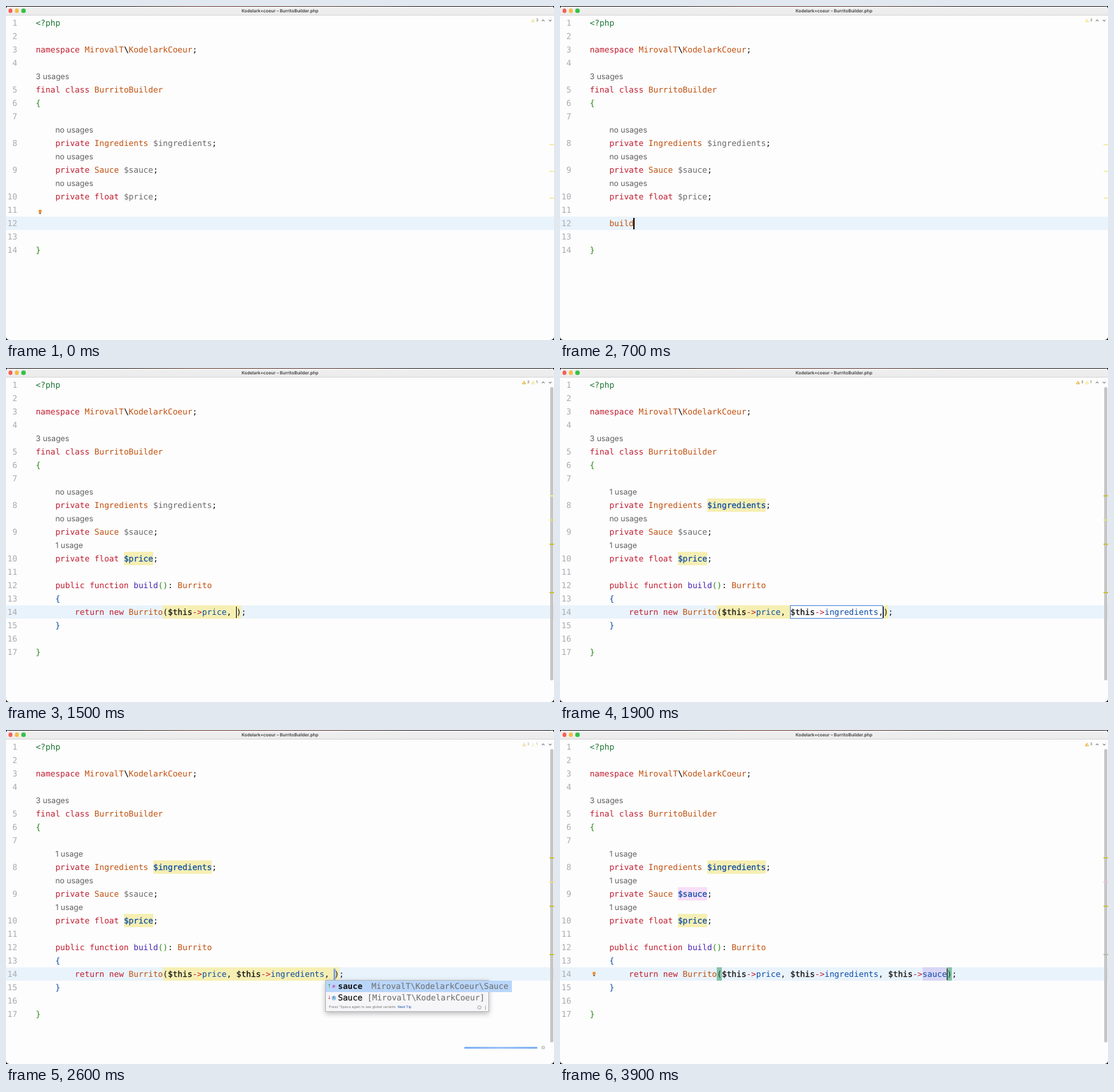
Recreate the animation shown at these times as an HTML page. Size 860 by 525 pixels, loop 4000 ms.

```html
<!DOCTYPE html>
<html lang="en">
<head>
<meta charset="utf-8">
<title>Code editor</title>
<style>
  html, body { margin: 0; width: 100%; height: 100%; overflow: hidden; background: #111; }
  i, b { font-style: normal; font-weight: normal; }
  #win {
    position: relative; width: 860px; height: 525px; overflow: hidden;
    border-radius: 5px; background: #fdfdfd;
    font: 12.757px/21px "DejaVu Sans Mono", monospace; color: #111;
    white-space: pre; text-rendering: geometricPrecision;
  }
  #win > * , .abs { position: absolute; }
  .bar {
    left: 0; top: 0; width: 860px; height: 15px; box-sizing: border-box;
    background: linear-gradient(#f2f0f0, #ebebeb); border-bottom: 1px solid #d6d6d6;
    font: 600 6.85px/15px Inter, sans-serif; color: #3c3c3c; text-align: center;
  }
  .edge { left: 0; top: 0; width: 860px; height: 1px; background: linear-gradient(90deg, #222 20%, #6b4334 35%, #5c3c34 60%, #222 75%); }
  .light { position: absolute; top: 4.4px; width: 6.4px; height: 6.4px; border-radius: 50%; }

  #code { left: 0; top: 16px; width: 860px; }
  #over { left: 0; top: 0; }
  .row { position: relative; height: 21px; line-height: 23px; padding-left: 46.7px; }
  .row.cur { background: #e9f3fb; }
  .num { position: absolute; left: 0; width: 17.6px; text-align: right; color: #a9abb0; }
  .hint { font: 12.2px/21px Inter, sans-serif; color: #626262; }
  .kw { color: #c01d30; }
  .cls { color: #c0500e; }
  .tag { color: #1a7430; }
  .grn { color: #2c8a18; }
  .blu, .prop { color: #0b4ca8; }
  .fn { color: #4a25b4; }
  .mute { color: #696969; }
  .bold { font-weight: bold; }
  .medium { -webkit-text-stroke: .3px; }
  .warn, .pink, .lav, .match, .box { display: inline-block; height: 21px; }
  .warn { background: #f6efb3; }
  .pink { background: #f7dff8; }
  .lav { background: #d9d6f6; }
  .match { background: #86c2a6; color: #103c28; }
  .box { background: #fdfdfd; box-shadow: inset 0 0 0 1px #4a7fd6; }
  .caret, .soft { position: relative; }
  .caret::before, .soft::before { content: ""; position: absolute; left: -.6px; top: -2px; width: 1.4px; height: 18px; background: #000; }
  .soft::before { left: -1.5px; width: 3px; background: #6f9be0; opacity: .85; }
  .bulb { left: 50.7px; width: 5.6px; height: 5.6px; border-radius: 50%; background: #ea923c; }
  .bulb::after { content: ""; position: absolute; left: 1.6px; top: 5.2px; width: 2.4px; height: 2.2px; background: #8d7a68; }

  .tri {
    top: 19.8px; width: 6.4px; height: 5.8px; clip-path: polygon(50% 0, 100% 100%, 0 100%);
    background: linear-gradient(#fff, #fff) center 70% / .8px 3px no-repeat, var(--c);
  }
  .count { top: 18px; font: 6px/10px Inter, sans-serif; color: #555; }
  .mark { left: 853px; width: 7px; height: 1.6px; }
  .thumb { left: 854.4px; top: 30px; width: 4.2px; height: 461px; border-radius: 2px; background: #c6c6c6; }
  .load { left: 719px; top: 498px; width: 115px; height: 2.6px; border-radius: 2px; background: linear-gradient(90deg, #7db0f2, #9cc3f6 50%, #7db0f2); }
  .stop { left: 840px; top: 496.2px; width: 6px; height: 6px; border-radius: 50%; background: #cfcfcf; font: 5px/6px Inter, sans-serif; color: #fff; text-align: center; }

  .popup { box-sizing: border-box; background: #f6f6f8; border: 1px solid #b4b4b8; box-shadow: 0 3px 8px #0004; }
  .item { position: relative; height: 18.4px; line-height: 20px; padding-left: 19px; box-sizing: border-box; }
  .item.on { background: #b9d6fa; }
  .type { position: absolute; right: 5.6px; color: #6c6c6c; }
  .dir { position: absolute; left: 2px; width: 5px; font: 8px/18px "DejaVu Sans", sans-serif; text-align: center; }
  .ico { position: absolute; left: 9.4px; top: 6px; width: 6.4px; height: 6.4px; border-radius: 50%; font: bold 5px/6.2px Inter, sans-serif; text-align: center; }
  .tip { position: absolute; left: 5px; bottom: 0; font: 5.35px/12px Inter, sans-serif; color: #777; }
  .tip b { color: #2a62b8; font-weight: 500; padding-left: 3px; }
  .ring { position: absolute; right: 11px; bottom: 3.4px; width: 3.6px; height: 3.6px; border: .8px solid #999; border-radius: 50%; }
  .dots { position: absolute; right: 4px; bottom: 5.2px; width: 1.3px; height: 1.3px; background: #555; box-shadow: 0 -2.2px #555, 0 2.2px #555; }
  .knob { position: absolute; left: 250px; top: 1px; width: 4px; height: 11px; border-radius: 2px; background: #bcbcbc; }
</style>
</head>
<body>
<div id="win">
  <div class="bar">Kodelark=coeur – BurritoBuilder.php<i class="light" style="left:3.8px;background:#f5605a"></i><i class="light" style="left:14px;background:#f6bb3e"></i><i class="light" style="left:24.3px;background:#35c148"></i></div>
  <div class="edge"></div>
  <div id="code"></div>
  <div id="over"></div>
  <svg width="860" height="30" style="left:0;top:0" fill="none" stroke="#555" stroke-width="1"><path d="M841 24l2-2.4 2 2.4M852 21.6l2 2.4 2-2.4"/></svg>
</div>
<script>
const STEP = 100, LOOP = 4000;
const tag = name => text => `<i class="${name}">${text}</i>`;
const [kw, cls, php, grn, blu, prop, fn, mute, bold, medium, warn, pink, lav, match, box] =
  'kw cls tag grn blu prop fn mute bold medium warn pink lav match box'.split(' ').map(tag);
const caret = tag('caret')(''), soft = tag('soft')('');
const NS = 'MirovalT\\KodelarkCoeur';

// Steps at which each argument appears and is confirmed
const ARGS = [['price', 14, 15], ['ingredients', 18, 21], ['sauce', 28, 30]];
const EXPAND = 8, DONE = 30;
const used = (name, n) => n >= ARGS.find(a => a[0] === name)[1];
const listOpen = n => n >= 12 && n < 14;
const sauceOpen = n => n >= 22 && n < 28;

function field(type, name, n) {
  const isUsed = used(name, n);
  const shade = name === 'sauce' ? pink : warn;
  return [
    { indent: 77.4, text: isUsed ? '1 usage' : 'no usages' },
    `    ${kw('private')} ${type} ${isUsed ? shade(blu(medium('$' + name))) : mute('$' + name)};`
  ];
}

function callArgs(n) {
  const done = n >= DONE, cursor = listOpen(n) || sauceOpen(n) ? soft : caret;
  let out = '';
  for (const [name, start, end] of ARGS) {
    if (n < start) break;
    const last = name === 'sauce';
    const ref = medium('$this') + kw('-&gt;') + (done && last ? lav(prop(name)) : prop(name));
    out += n < end ? box(ref + (last ? '' : ',')) : ref + (last ? '' : ', ');
  }
  const paren = done ? match : s => s;
  const all = paren('(') + out + cursor + paren(')');
  return n >= 14 && !done ? warn(all) : all;
}

function method(n) {
  if (n < EXPAND) {
    const typed = Math.max(0, Math.min(5, n - 1));
    return ['    ' + cls('build'.slice(0, typed)) + (n ? caret : ''), ''];
  }
  const fresh = n < 14;
  const name = fresh ? cls('build') : fn('build');
  const brace = fresh ? s => s : blu;
  const result = n > 8 ? cls('Burrito') : '';
  const body = n < 10 ? '' : '        ' + kw('return ') +
    (n < 11 ? caret : kw('new ') + cls('Burrito') + (n < 12 ? caret : callArgs(n) + ';'));
  return [
    `    ${kw('public function')} ${name}${grn('()')}: ${result}${n < 10 ? caret : ''}`,
    '    ' + brace('{'), body, '    ' + brace('}'), ''
  ];
}

function code(n) {
  const rows = [
    php('&lt;?php'), '',
    `${kw('namespace')} ${cls('MirovalT')}${bold('\\')}${cls('KodelarkCoeur')};`, '',
    { indent: 46.7, text: '3 usages' },
    `${kw('final class')} ${cls('BurritoBuilder')}`, grn('{'), '',
    ...field(cls('Ingredients'), 'ingredients', n),
    ...field(cls('Sauce'), 'sauce', n),
    ...field(kw('float'), 'price', n),
    '', ...method(n), grn('}')
  ];
  const current = n < 10 ? 12 : 14;
  let num = 0;
  return rows.map(row => {
    if (row.text) return `<div class="row hint" style="padding-left:${row.indent}px">${row.text}</div>`;
    num++;
    return `<div class="row${num === current ? ' cur' : ''}"><b class="num">${num}</b>${row}</div>`;
  }).join('');
}

const ICONS = { f: ['#f3b9bc', '#b8343f'], p: ['#cdb8ee', '#6a3cb0'], C: ['#9fcbea', '#1f6f9f'], c: ['#f2c079', '#9a6010'] };
const ARROWS = { '↑': '#3f9a4a', '↓': '#d0404a', '•': '#7f97c4' };

function item([dir, icon, name, rest, type], i) {
  const [bg, ink] = ICONS[icon];
  const strong = !i || name === 'self';
  return `<div class="item${i ? '' : ' on'}"><i class="dir" style="color:${ARROWS[dir]}">${dir}</i>` +
    `<i class="ico" style="background:${bg};color:${ink}">${icon}</i>` +
    `${strong ? bold(name) : medium(name)}${mute(rest)}${tag('type')(type)}</div>`;
}

function popup(x, y, h, listW, items, tip, extra = '') {
  const clip = extra ? 'overflow:hidden;' : '';
  return `<div class="popup abs" style="left:${x}px;top:${y}px;width:257px;height:${h}px">` +
    `<div style="${clip}width:${listW}px;height:${h - 14}px">${items.map(item).join('')}</div>${extra}` +
    `<div class="tip">${tip}<b>Next Tip</b></div><i class="ring"></i><i class="dots"></i></div>`;
}

const MATHS = [
  ['•', 'p', 'price', '', 'float'],
  ['↑', 'f', 'cos', '(num: float)', 'float'],
  ['↓', 'f', 'array_sum', '(array: a…', 'float|int'],
  ['↑', 'f', 'fdiv', '(num1: float, num2…', 'float'],
  ['↑', 'C', 'self', ` ${NS}\\…`, ''],
  ['↓', 'f', 'doubleval', '(value: mixed)', 'float'],
  ['↓', 'f', 'expm1', '(num: float)', 'float'],
  ['', 'f', 'floatval', '(value: mixed)', 'float'],
  ['', 'f', 'floor', '(num: float|int)', 'float'],
  ['', 'f', 'hexdec', '(hex_string:…', 'float|int'],
  ['', 'f', 'log', '(num: float, [base:…', 'float'],
  ['', 'c', 'M_2_PI', ' = 0.63661977236…', 'float']
];
const SAUCES = [
  ['↑', 'p', 'sauce', '', `${NS}\\Sauce`],
  ['↓', 'C', 'Sauce', ` [${NS}]`, '']
];

const mark = (y, color) => `<i class="mark abs" style="top:${y - .8}px;background:${color}"></i>`;

function marks(n) {
  const pale = '#f4ecaa', olive = '#c8c135';
  if (n < EXPAND) return [218, 260, 302].map(y => mark(y, pale)).join('');
  return '<i class="thumb abs"></i>' +
    mark(201, used('ingredients', n) ? olive : pale) +
    mark(239, used('sauce', n) ? '#f0b9dc' : '#ece08a') +
    mark(277, used('price', n) ? olive : pale) +
    (n >= 14 ? mark(353, n < DONE ? olive : '#a9bcae') : '');
}

function problems(n) {
  const sign = (x, color, count) => `<i class="tri abs" style="left:${x}px;--c:${color}"></i>` +
    `<i class="count abs" style="left:${x + 8}px">${count}</i>`;
  const strong = '#eeb03c', weak = '#f3e68c';
  const busy = n >= EXPAND && n < 14 || n >= 21 && n < 28;
  const signs = n < 14 ? sign(823.8, weak, 3)
    : n < DONE ? sign(809.7, strong, 3) + sign(824, weak, 1)
    : sign(823.8, strong, 3);
  return `<div style="opacity:${busy ? .5 : 1}">${signs}</div>`;
}

function overlay(n) {
  let out = marks(n) + problems(n);
  if (n < 2) out += '<i class="bulb abs" style="top:319.6px"></i>';
  if (n >= DONE) out += '<i class="bulb abs" style="top:379.6px"></i>';
  if (listOpen(n)) out += popup(240, 148, 225, 249, MATHS, 'Type more characters to see all suggestions', '<i class="knob"></i>');
  if (sauceOpen(n)) out += popup(501, 393, 50, 292, SAUCES, 'Press ^Space again to see global variants');
  if (listOpen(n) || sauceOpen(n)) out += '<i class="load abs"></i><i class="stop abs">×</i>';
  return out;
}

const codeEl = document.getElementById('code'), overEl = document.getElementById('over');
const begin = performance.now();
let shown = -1;

function draw() {
  const n = Math.floor((performance.now() - begin) % LOOP / STEP);
  if (n !== shown) {
    shown = n;
    codeEl.innerHTML = code(n);
    overEl.innerHTML = overlay(n);
  }
  requestAnimationFrame(draw);
}
draw();
</script>
</body>
</html>
```
